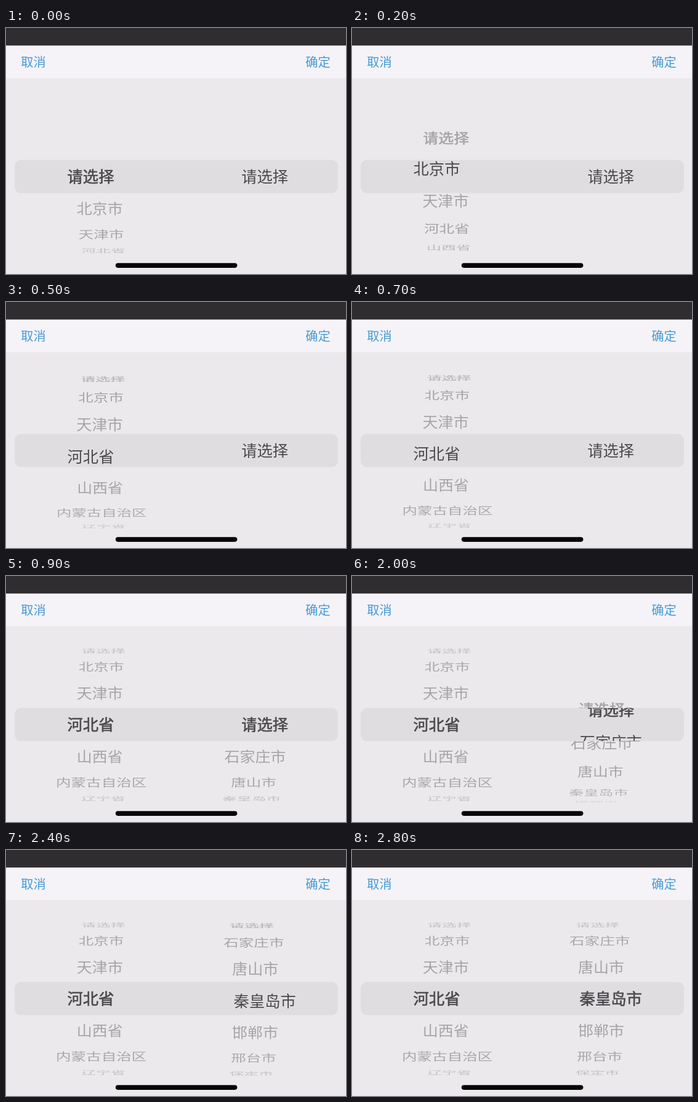
An HTML page with a canvas that plays this animation: 552 px wide and 400 px high, repeating every 3.6 s.

```html
<!DOCTYPE html>
<html lang="zh-CN">
<head>
<meta charset="utf-8">
<title>Picker</title>
<style>
  html, body { margin: 0; width: 100%; height: 100%; overflow: hidden; background: #ebe9ec; }
  canvas { display: block; width: 552px; height: 400px; }
</style>
</head>
<body>
<canvas id="stage"></canvas>
<script>
const W = 552, H = 400, LOOP = 3600, TICK = 100;
const MID = 241.9, RADIUS = 126, STEP = 24.1 * Math.PI / 180;
const BAND = { x: 14, y: 214.4, w: 525, h: 54.2 };
const FONT = '"Noto Sans CJK SC", "Noto Sans CJK", "Noto Sans", sans-serif';
const PROMPT = '请选择';
const PROVINCES = [PROMPT, '北京市', '天津市', '河北省', '山西省', '内蒙古自治区', '辽宁省'];
const CITIES = [PROMPT, '石家庄市', '唐山市', '秦皇岛市', '邯郸市', '邢台市', '保定市'];

// [time in ms, scroll position in rows]
const LEFT = [[0, 0], [100, .56], [200, 1.246], [300, 1.86], [400, 2.4], [500, 2.811],
              [600, 2.811], [700, 2.9], [800, 2.97], [900, 3]];
const RIGHT = [[1900, 0], [2000, .45], [2100, 1.15], [2200, 1.83], [2300, 2.47], [2400, 2.925],
               [2600, 2.925], [2700, 2.97], [2800, 3]];

const canvas = document.getElementById('stage');
const ctx = canvas.getContext('2d');
const dpr = window.devicePixelRatio || 1;
canvas.width = W * dpr;
canvas.height = H * dpr;

function valueAt(keys, t) {
  if (t <= keys[0][0]) return keys[0][1];
  for (let i = 1; i < keys.length; i++) {
    const [t0, a] = keys[i - 1], [t1, b] = keys[i];
    if (t <= t1) return a + (b - a) * (t - t0) / (t1 - t0);
  }
  return keys[keys.length - 1][1];
}

function box(x, y, w, h, r, color) {
  ctx.fillStyle = color;
  ctx.beginPath();
  ctx.roundRect(x, y, w, h, r);
  ctx.fill();
}

function label(text, x, y, size, color, { sx = 1, sy = 1, bold = false, alpha = 1 } = {}) {
  ctx.save();
  ctx.translate(x, y);
  ctx.scale(sx, sy);
  ctx.globalAlpha = alpha;
  ctx.font = `400 ${size}px ${FONT}`;
  ctx.textAlign = 'center';
  ctx.fillStyle = ctx.strokeStyle = color;
  ctx.fillText(text, 0, size * .36);
  if (bold) {
    ctx.lineWidth = .65;
    ctx.lineJoin = 'round';
    ctx.strokeText(text, 0, size * .36);
  }
  ctx.restore();
}

function clipped(rects, draw) {
  ctx.save();
  ctx.beginPath();
  rects.forEach(r => ctx.rect(...r));
  ctx.clip();
  draw();
  ctx.restore();
}

// Rows lie on a cylinder; the band shows a darker, flatter copy of them.
function wheel(rows, pos, boldRow, lensX, sideX) {
  const each = draw => rows.forEach((text, i) => {
    const a = (i - pos) * STEP;
    if (Math.abs(a) < 1.56) draw(text, a, MID + RADIUS * Math.sin(a), i === boldRow);
  });
  const bottom = BAND.y + BAND.h;
  clipped([[0, 82, W, BAND.y - 82], [0, bottom, W, H - bottom]], () =>
    each((text, a, y, bold) => {
      const s = 1 / (1 + .08 * (1 - Math.cos(a)));
      const alpha = Math.max(.3, 1 - Math.max(0, Math.abs(a) - .8) * .85);
      label(text, W / 2 + sideX * s, y, 25.2, '#a5a4a7', { sx: s, sy: Math.cos(a), bold, alpha });
    }));
  clipped([[0, BAND.y, W, BAND.h]], () =>
    each((text, a, y, bold) => label(text, lensX, y, 25.3, '#4a494c', { sy: Math.cos(a), bold })));
}

function render(t) {
  ctx.setTransform(dpr, 0, 0, dpr, 0, 0);
  box(0, 0, W, H, 0, '#ebe9ec');
  box(0, 28, W, 53.5, 0, '#f5f3f7');
  box(0, 0, W, 28.6, 0, '#2f2d30');
  label('取消', 44.5, 55.5, 20.2, '#459ad6');
  label('确定', 506.5, 55.5, 20.2, '#459ad6');
  box(BAND.x, BAND.y, BAND.w, BAND.h, 11, '#dfdde0');

  const chosen = t >= 900;
  wheel(PROVINCES, valueAt(LEFT, t), chosen ? 3 : 0, 137.5, -124.6);
  wheel(chosen ? CITIES : [PROMPT], valueAt(RIGHT, t), !chosen ? -1 : t < 2800 ? 0 : 3, 420.2, 129.5);

  box(177.8, 382.3, 197.6, 7.6, 3.8, '#050505');
}

const start = performance.now();
function frame() {
  const t = (performance.now() - start) % LOOP;
  render(Math.floor(t / TICK) * TICK);
  requestAnimationFrame(frame);
}
frame();
</script>
</body>
</html>
```
